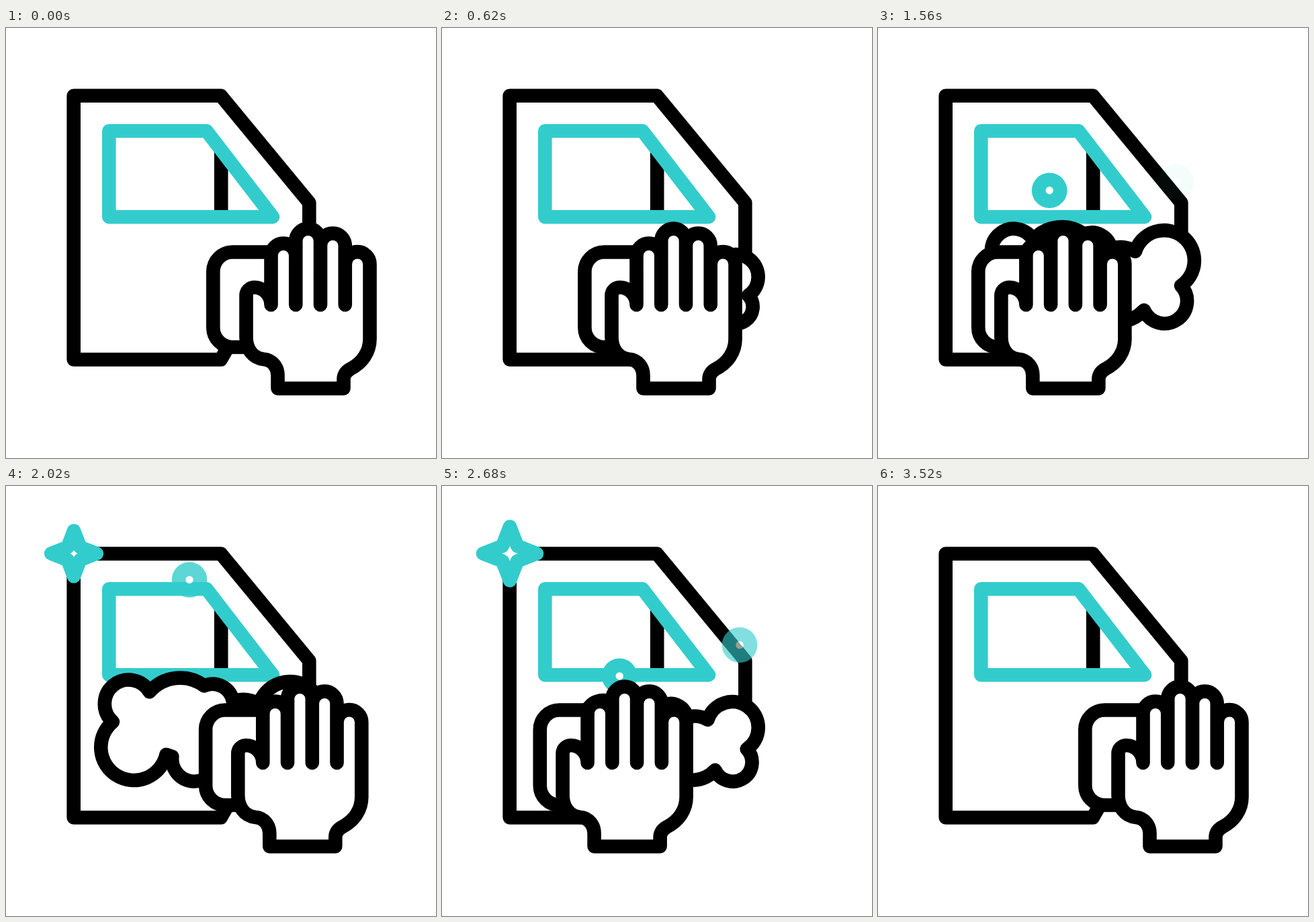
An HTML page for the animation above (3600 ms loop, 640 px wide and 640 px high).

```html
<!DOCTYPE html>
<html lang="en">
<head>
<meta charset="utf-8">
<title>Door wash</title>
<style>
  html, body { margin: 0; width: 100%; height: 100%; overflow: hidden; background: #fff; }
  svg { display: block; width: 100vw; height: 100vh; }
  .ink, .aqua { stroke-width: 20.6; stroke-linejoin: round; stroke-linecap: round; }
  .ink { stroke: #000; }
  .aqua { stroke: #33cccc; }
</style>
</head>
<body>
<svg viewBox="0 0 640 640" fill="#fff">
  <path class="ink" d="M451.3 348V260L319.8 100.7H100.7V493.5H319.8C343 449 395 385 451 372"/>
  <path class="ink" d="M320.2 182V275" style="stroke-linecap:butt"/>
  <path class="aqua" fill="none" d="M153.3 153.3H298.4L397 281.2H153.3Z"/>
  <path class="aqua" id="star"/>
  <circle class="aqua" id="right" r="16"/>
  <circle class="aqua" id="left" r="16"/>
  <path class="ink" id="foam" d="M212 306A61 61 0 0 1 294 297A31 31 0 0 1 337 320A48 48 0 0 1 376 324.5
    A48.6 48.6 0 1 1 449.5 379.5A36.2 36.2 0 1 1 390 419A60 60 0 0 1 308 424A33.5 33.5 0 0 1 246 403
    L237 400A49.5 49.5 0 1 1 157 351A36 36 0 1 1 212 306Z"/>
  <path class="ink" id="sponge" d="M415 333.5H337A29 29 0 0 0 308 362.5V446A29 29 0 0 0 337 475H415Z"/>
  <path class="ink" id="hand"/>
</svg>
<script>
const LOOP = 3600;
const el = id => document.getElementById(id);
const clamp = v => Math.max(0, Math.min(1, v));
const linear = u => u;
const smooth = u => u * u * (3 - 2 * u);

// keys: [[time, value], ...]
function at(keys, t, ease = linear) {
  const i = keys.findIndex(k => k[0] > t);
  if (i < 0) return keys[keys.length - 1][1];
  if (i === 0) return keys[0][1];
  const [t0, a] = keys[i - 1], [t1, b] = keys[i];
  return a + (b - a) * ease((t - t0) / (t1 - t0));
}

// the hand turns round at each of these times, right and left by turns
const wipe = [0, 400, 900, 1500, 2120, 2708, 3510].map((t, i) => [t, i % 2]);
const foamSize = [[0, .48], [620, .685], [1160, .813], [1560, .926], [2130, 1.01], [LOOP, .43]];
const starSize = [[1730, 0], [2200, 50], [2690, 40], [3160, 50], [3510, 0]];

const bubbles = [
  { node: el('right'), starts: [-30, 1000, 2205], life: 568, x: 452, y: 328.7, rise: 109, time: 786, power: 2, sway: 20 },
  { node: el('left'), starts: [1150, 2455], life: 990, x: 264, y: 333, rise: 222, time: 1000, power: 1, sway: 30 }
];

function handPath() {
  const step = 36.75, r = step / 2, web = 412;
  let top = 'M394 ' + web, webs = '';
  [339, 317, 324, 351.5].forEach((y, i) => {
    const x = 394 + step * i;
    top += `V${y}A${r} ${r} 0 0 1 ${x + step} ${y}`;
    if (i) webs += `M${x} ${y}V${web}`;
  });
  return top + `V463C541 482 530 498 512 507.5C506 511 502 516 502 523V536.5H404V517
    C404 505 396 494 383 493C366 491 357 477 357 460V398A12 12 0 0 1 369 386
    C383 386 394 398 394 ${web}Z` + webs;
}

function starPath(r) {
  const p = (x, y) => (101 + x * r).toFixed(2) + ' ' + (100.5 + y * r).toFixed(2);
  let d = '', x = 0, y = -1;
  for (let i = 0; i < 4; i++) {
    // (x, y) points along the arm, (-y, x) toward the next one
    const q = (a, b) => p(a * x - b * y, a * y + b * x);
    d += (i ? 'L' : 'M') + q(1, 0) + 'L' + q(.38, .24) + 'Q' + q(.26, .26) + ' ' + q(.24, .38);
    [x, y] = [-y, x];
  }
  return d + 'Z';
}

function drawBubble(b, t) {
  const start = b.starts.find(s => t >= s && t < s + b.life);
  b.node.style.display = start === undefined ? 'none' : '';
  if (start === undefined) return;
  const age = t - start;
  const y = b.y - b.rise * (1 - (1 - age / b.time) ** b.power);
  b.node.setAttribute('cx', b.x - 9 * Math.cos((y - 235) / b.sway));
  b.node.setAttribute('cy', y);
  b.node.style.opacity = clamp((b.life - age) / 150);
}

function draw(t) {
  const w = at(wipe, t, smooth);
  el('hand').setAttribute('transform', `translate(${.5 - 179 * w} 0)`);
  el('sponge').setAttribute('transform', `translate(${.3 - 163.5 * w} 0)`);

  const s = at(foamSize, t);
  el('foam').setAttribute('transform', `translate(470 439.5) scale(${s}) translate(-470 -440)`);
  el('foam').style.strokeWidth = 20.6 / s;

  const r = at(starSize, t, smooth);
  el('star').style.display = r > .5 ? '' : 'none';
  el('star').setAttribute('d', starPath(r));

  bubbles.forEach(b => drawBubble(b, t));
}

el('hand').setAttribute('d', handPath());
const begin = performance.now();
function tick(now) {
  draw(Math.max(0, now - begin) % LOOP);
  requestAnimationFrame(tick);
}
draw(0);
requestAnimationFrame(tick);
</script>
</body>
</html>
```
